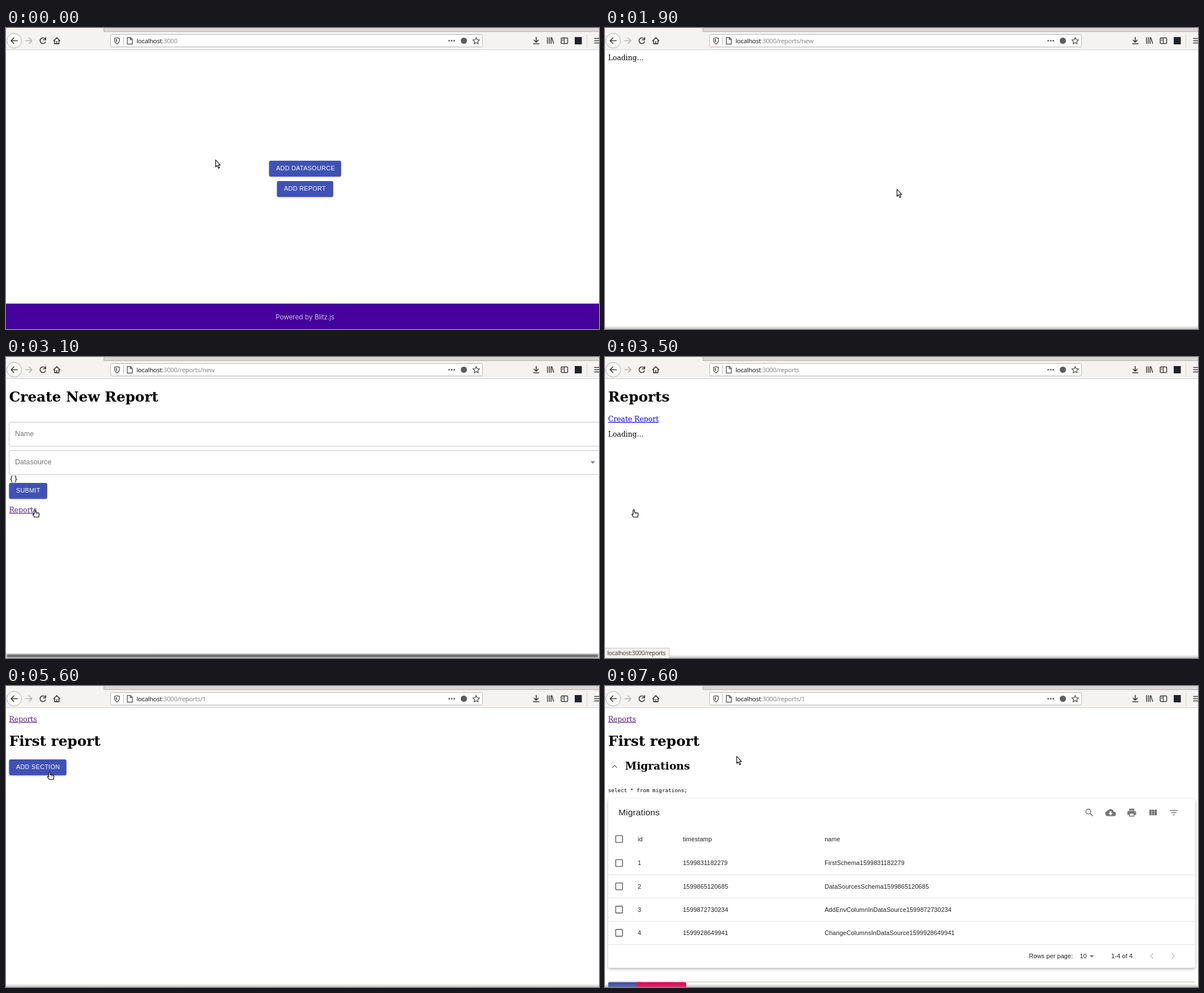
These frames come from a looping animation (1051x533 px, 8000 ms). An HTML page:

```html
<!DOCTYPE html>
<html lang="en">
<head>
<meta charset="utf-8">
<title>Report builder</title>
<style>
html, body { margin: 0; width: 100%; height: 100%; overflow: hidden; background: #fff; }
svg { display: block; }
text { white-space: pre; }
.sans { font-family: "Liberation Sans", Arial, sans-serif; }
.serif { font-family: "DejaVu Serif", serif; }
.mono { font-family: "DejaVu Sans Mono", monospace; }
.url { font: 11.5px "Noto Sans", sans-serif; letter-spacing: -.4px; }
.status { font: 10.5px "Noto Sans", sans-serif; letter-spacing: -.36px; }
.powered { font: 300 11.9px Inter, sans-serif; }
.link { text-decoration: underline; fill: #551a8b; }
.raised { filter: drop-shadow(0 1.4px 1px rgba(0,0,0,.32)); }
.lifted { filter: drop-shadow(0 2px 2px rgba(0,0,0,.38)); }
.paper { filter: drop-shadow(0 2px 2.5px rgba(0,0,0,.3)); }
.line { fill: none; stroke: #3b3b3b; stroke-width: 1.7; stroke-linecap: round; stroke-linejoin: round; }
.soft { stroke: #5c5c5c; stroke-width: 1.4; }
.grey { fill: #757575; }
</style>
</head>
<body>
<svg id="stage" width="1051" height="533" viewBox="0 0 1051 533"></svg>
<script>
const LOOP = 8000;
const UNIT = 0.778;
const LEFT = 5.5;
const BODY = 16 * UNIT, H1 = 32 * UNIT, H2 = 24 * UNIT, SMALL = 14 * UNIT;

const text = (x, y, label, size, cls, extra = '') =>
  `<text x="${x}" y="${y}" font-size="${size}" class="${cls}" ${extra}>${label}</text>`;
const rect = (x, y, w, h, extra = '') =>
  `<rect x="${x}" y="${y}" width="${w}" height="${h}" ${extra}/>`;
const path = (d, cls, extra = '') => `<path d="${d}" class="${cls}" ${extra}/>`;
const group = (id, content) => `<g id="${id}">${content}</g>`;

const heading = (x, y, label, size = H1) => text(x, y, label, size, 'serif', 'font-weight="700"');
const link = (x, y, label, id = '') => text(x, y, label, BODY, 'serif link', id && `id="${id}"`);
const cell = (x, y, label) => text(x, y, label, SMALL, 'sans', `fill="#212121" letter-spacing="${.0107 * SMALL}"`);

function button(x, y, w, label, hoverId) {
  const shape = fill => rect(x, y, w, 28, `rx="3" fill="${fill}"`);
  const hover = hoverId ? `<g id="${hoverId}" class="lifted">${shape('#303f9f')}</g>` : '';
  return `<g class="raised">${shape('#3f51b5')}</g>${hover}` +
    text(x + 12.4, y + 16.9, label, SMALL, 'sans', `fill="#fff" letter-spacing="${.0286 * SMALL}"`);
}

function toolbar() {
  const dots = [785.5, 790, 794.5].map(x => `<circle cx="${x}" cy="22.5" r="1.5" fill="#5c5c5c"/>`).join('');
  const star = Array.from({ length: 10 }, (_, i) => {
    const r = i % 2 ? 2.9 : 6.3, a = i * Math.PI / 5 - Math.PI / 2;
    return `${(833.3 + r * Math.cos(a)).toFixed(2)} ${(23 + r * Math.sin(a)).toFixed(2)}`;
  }).join('L');
  return rect(0, 0, 1051, 39, 'fill="#f4f3f2"') +
    rect(173, 0, 878, 6, 'fill="#d9d8d6"') +
    path('M173.5 0V6.5H1051', '', 'fill="none" stroke="#b5b3b1"') +
    path('M0 38.5H1051', '', 'stroke="#cfcecd"') +
    '<circle cx="14.5" cy="22.5" r="13" fill="#fbfbfb" stroke="#aaa"/>' +
    path('M20 22.5H9.5M14 17.5L9 22.5L14 27.5', 'line') +
    path('M35 22.5H45.5M41 17.5L46 22.5L41 27.5', 'line', 'style="stroke:#b5b4b3"') +
    path('M69 19A5 5 0 1 0 70 24.5M70.3 17V21H66', 'line') +
    path('M84.5 22.5L90 17L95.5 22.5M86.2 22V27.8H93.8V22M90 27.5V24', 'line') +
    rect(185.5, 11.5, 659, 22, 'rx="2" fill="#fff" stroke="#b9b8b7"') +
    path('M192.5 18Q196.5 18 196.8 16.8Q197 18 201 18V21Q201 26 196.8 28.3Q192.5 26 192.5 21Z', 'line soft') +
    path('M196.8 19.5V26Q194.5 24 194.5 20Z', '', 'fill="#5c5c5c"') +
    path('M208.5 15V30', '', 'stroke="#bbb"') +
    path('M215 16.8H220.5L224 20.3V28.5H215ZM220.3 17V20.5H224', 'line soft') +
    text(231.3, 27, '<tspan fill="#222">localhost</tspan><tspan fill="#8b8b8b">:3000</tspan><tspan id="route" fill="#8b8b8b"></tspan>', 11.5, 'url') +
    dots + '<circle cx="811.5" cy="22.5" r="5.5" fill="#5c5c5c"/>' +
    path(`M${star}Z`, 'line soft') +
    path('M939.7 16.5V25M936 21.5L939.7 25.2L943.4 21.5M935 28H944.5', 'line') +
    path('M959.7 17V27.5M963 17V27.5M966.2 17V27.5M967.5 17.2L970.5 27.3', 'line', 'style="stroke-width:1.5"') +
    rect(984, 17.5, 11.5, 10, 'rx="1.5" class="line" style="stroke-width:1.5"') +
    path('M989.5 17.5V27.5M986 20H988M986 22.5H988', 'line', 'style="stroke-width:1.2"') +
    rect(1008, 16, 12.5, 13, 'fill="#20232a"') +
    path('M1029.5 10V35', '', 'stroke="#d4d3d2"') +
    path('M1043 18.5H1052M1043 22.5H1052M1043 26.5H1052', 'line', 'style="stroke-width:1.5"');
}

const home = () =>
  button(466.3, 235, 127.6, 'ADD DATASOURCE') +
  button(480.3, 271, 99.6, 'ADD REPORT', 'reportHover') +
  rect(0, 488, 1051, 45, 'fill="#45009d"') +
  text(530, 515.5, 'Powered by Blitz.js', 11.9, 'powered', 'fill="#f4f4f4" text-anchor="middle"');

function form() {
  const field = (y, label) =>
    rect(LEFT, y, 1060, 42.5, 'rx="3" fill="none" stroke="#c4c4c4"') +
    text(15.9, y + 24.7, label, BODY, 'sans', 'fill="#757575" letter-spacing=".117"');
  return heading(LEFT, 79, 'Create New Report') +
    field(115.5, 'Name') + field(165.5, 'Datasource') +
    path('M1036 184.7H1044L1040 188.7Z', 'grey') +
    text(LEFT, 219.5, '{}', BODY, 'serif') +
    button(LEFT, 223, 67.5, 'SUBMIT') +
    link(LEFT, 275, 'Reports') +
    rect(0, 524.5, 1051, 9, 'fill="#cfcfcf"') +
    rect(1.5, 526.7, 1048, 5, 'rx="2.5" fill="#737373"');
}

function list() {
  const item = (y, label, id) => `<circle cx="28" cy="${y - 4}" r="2.3"/>` + link(36.6, y, label, id);
  return heading(LEFT, 79, 'Reports') + link(LEFT, 114, 'Create Report', 'createLink') +
    group('listLoading', text(LEFT, 141, 'Loading...', BODY, 'serif')) +
    group('items', item(141, 'New report') + item(156, 'First report', 'firstLink'));
}

function table() {
  const rows = [
    ['1', '1599831182279', 'FirstSchema'],
    ['2', '1599865120685', 'DataSourcesSchema'],
    ['3', '1599872730234', 'AddEnvColumnInDataSource'],
    ['4', '1599928649941', 'ChangeColumnsInDataSource'],
  ];
  const box = y => rect(19, y - 6, 12, 12, 'rx="1" fill="none" stroke="#6b6b6b" stroke-width="1.6"');
  const line = ([id, stamp, name], y) =>
    box(y) + cell(58, y + 3.8, id) + cell(138.2, y + 3.8, stamp) + cell(389.2, y + 3.8, name);
  const icon = (x, content) => `<g class="grey" transform="translate(${x - 9.3} 215) scale(${UNIT})">${content}</g>`;
  const body = rows.map(([id, stamp, name], i) => {
    const y = 313.5 + i * 41.2;
    return line([id, stamp, name + stamp], y) + rect(LEFT, y + 20.4, 1040.5, 1, 'fill="#e0e0e0"');
  }).join('');
  return path('M13.3 144.2L17 140.3L20.7 144.2', 'line', 'style="stroke:#757575;stroke-width:1.4"') +
    heading(35.5, 147.5, 'Migrations', H2) +
    text(LEFT, 188, 'select * from migrations;', 12 * UNIT, 'mono') +
    `<g class="paper">${rect(LEFT, 199.5, 1040.5, 299.5, 'rx="3" fill="#fff"')}</g>` +
    text(24, 228.5, 'Migrations', 20 * UNIT, 'sans', 'fill="#212121" letter-spacing=".117"') +
    icon(858.5, '<circle cx="9.5" cy="9.5" r="5.5" fill="none" stroke="#757575" stroke-width="2"/>' +
      '<path d="M14 14L19.8 19.8" stroke="#757575" stroke-width="2.2"/>') +
    icon(896, '<path fill-rule="evenodd" d="M19.35 10C18.7 6.6 15.6 4 12 4 9.1 4 6.6 5.6 5.35 8 2.3 8.4 0 10.9 0 14a6 6 0 0 0 6 6h13a5 5 0 0 0 .35-10zM17 13l-5 5-5-5h3V9h4v4z"/>') +
    icon(933.5, '<path fill-rule="evenodd" d="M6 3H18V7H6ZM5 8H19a3 3 0 0 1 3 3v6H18v4H6v-4H2v-6a3 3 0 0 1 3-3ZM8 14v5h8v-5ZM18 11a1 1 0 1 0 2 0 1 1 0 1 0-2 0Z"/>') +
    icon(971, rect(4, 5, 5, 13) + rect(10, 5, 5, 13) + rect(16, 5, 5, 13)) +
    icon(1008, rect(3, 6, 18, 2) + rect(6, 11, 12, 2) + rect(10, 16, 4, 2)) +
    line(['id', 'timestamp', 'name'], 271) + body +
    cell(751.5, 482, 'Rows per page:') + cell(841.5, 481.5, '10') +
    path('M858.8 476.8H866.6L862.7 480.7Z', 'grey') + cell(897.3, 482, '1-4 of 4') +
    path('M971 474.2L967 478.2L971 482.2M1005 474.2L1009 478.2L1005 482.2', 'line', 'style="stroke:#bdbdbd;stroke-width:1.5"') +
    rect(LEFT, 523.5, 1040.5, 1, 'fill="#b4b4b4"') +
    rect(LEFT, 524.5, 60, 20, 'rx="3" fill="#3f51b5"') +
    rect(56, 524.5, 88, 20, 'rx="3" fill="#ea0054"');
}

const report = () =>
  link(LEFT, 62.8, 'Reports') + heading(LEFT, 106, 'First report') +
  group('section', button(LEFT, 130, 101.5, 'ADD SECTION', 'sectionHover')) +
  group('table', table());

const pointer =
  path('M.5 .5V13L3.3 10.5L5.4 15.4L7.4 14.5L5.3 9.8H9Z', '', 'id="arrow" fill="#fff" stroke="#000" stroke-width="1.1" stroke-linejoin="round"') +
  group('hand',
    path('M-1.2 1.2C-1.2 -.1 1.3 -.1 1.3 1.2V5L6.8 6Q8 6.4 7.9 8L7 13.5H-.4L-3.4 9Q-3.2 7.2 -1.2 8.7Z', '', 'fill="#fff" stroke="#000" stroke-width="1.2" stroke-linejoin="round"') +
    path('M3 6.2V8.3M5.2 6.6V8.5', '', 'stroke="#000" stroke-width=".8"'));

const stage = document.getElementById('stage');
stage.innerHTML =
  '<defs><linearGradient id="edge" x2="0" y2="1"><stop stop-color="#888" stop-opacity="0"/><stop offset="1" stop-color="#888" stop-opacity=".5"/></linearGradient></defs>' +
  rect(0, 0, 1051, 533, 'fill="#fff"') +
  group('home', home()) +
  group('loading', text(LEFT, 56.7, 'Loading...', BODY, 'serif')) +
  group('form', form()) + group('list', list()) + group('report', report()) +
  rect(0, 527, 1051, 6, 'id="shade" fill="url(#edge)"') +
  group('status', rect(-1, 515.5, 115, 19, 'id="statusBox" fill="#f2f1f0" stroke="#c6c5c4"') +
    text(4, 528, '', 10.5, 'status', 'id="statusText" fill="#444"')) +
  toolbar() + group('cursor', pointer);

const parts = {};
stage.querySelectorAll('[id]').forEach(el => { parts[el.id] = el; });

// Each entry holds from its time until the next one.
const moves = [
  [0, 371, 233], [100, 389, 241], [300, 399, 250], [400, 415, 262], [500, 437, 278],
  [600, 462, 291], [700, 487, 300], [800, 507, 296, 'hand'], [900, 515, 290, 'hand'],
  [1000, 518, 284, 'hand'], [1900, 517, 285], [2200, 420, 250], [2300, 272, 216],
  [2700, 104, 257], [2900, 65, 271], [3100, 51, 270, 'hand'], [3700, 50, 271],
  [4000, 73, 188], [4200, 73, 184], [4400, 77, 162], [4600, 77, 160], [4700, 77, 158],
  [4900, 77, 156], [5100, 77, 152, 'hand'], [5900, 107, 146, 'hand'], [6200, 147, 144],
  [6500, 154, 191], [6800, 153, 194], [7300, 180, 170], [7500, 214, 146], [7600, 233, 124],
];
const pages = [
  [0, 'home', ''], [1900, 'loading', '/reports/new'], [2100, 'form', '/reports/new'],
  [3500, 'list', '/reports'], [5600, 'report', '/reports/1'],
];
const reportHover = [[0, 0], [800, .35], [900, .75], [1000, 1]];
const sectionHover = [[0, 0], [5900, 1], [6200, .15], [6500, 0]];
const statusPaths = [[0, ''], [3500, '/reports'], [3700, ''], [5300, '/reports/1'], [5600, '']];

const at = (steps, t) => steps.findLast(step => step[0] <= t);
const show = (id, on) => { parts[id].style.display = on ? '' : 'none'; };

function draw(t) {
  const [, page, route] = at(pages, t);
  for (const [, name] of pages) show(name, name === page);
  show('shade', page !== 'home' && page !== 'form');
  parts.route.textContent = route;

  parts.reportHover.style.opacity = at(reportHover, t)[1];
  parts.sectionHover.style.opacity = at(sectionHover, t)[1];

  const listed = t >= 3700;
  show('items', listed);
  show('listLoading', !listed);
  parts.createLink.style.fill = listed ? '' : '#0000ee';
  parts.firstLink.style.fill = t >= 5300 ? '#ee0000' : '';
  show('section', t < 7300);
  show('table', t >= 7300);

  const target = at(statusPaths, t)[1];
  show('status', target);
  parts.statusText.textContent = 'localhost:3000' + target;
  parts.statusBox.setAttribute('width', target === '/reports' ? 115 : 125);

  const [, x, y, kind = 'arrow'] = at(moves, t);
  parts.cursor.setAttribute('transform', `translate(${x} ${y})`);
  show('arrow', kind === 'arrow');
  show('hand', kind === 'hand');
}

const start = performance.now();
function tick() {
  draw((performance.now() - start) % LOOP);
  requestAnimationFrame(tick);
}
tick();
</script>
</body>
</html>
```
